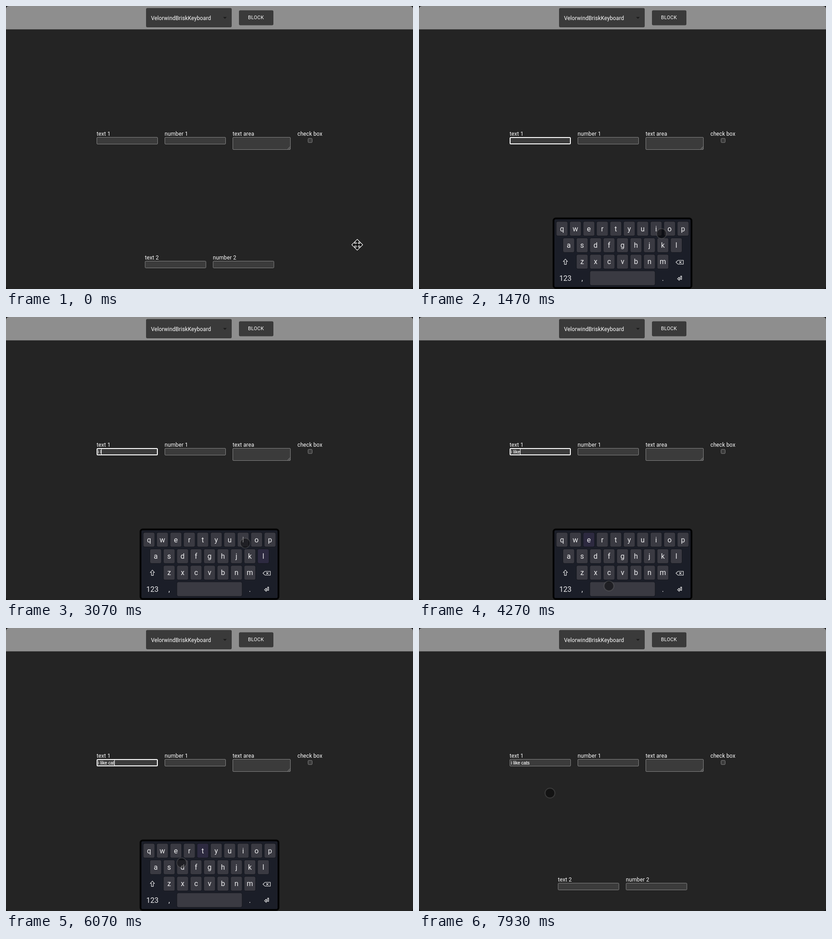
An HTML page for the animation above (8 s loop, 898 by 624 pixels).

```html
<!DOCTYPE html>
<html lang="en">
<head>
<meta charset="utf-8">
<title>On-screen keyboard</title>
<style>
  html, body { margin: 0; width: 100%; height: 100%; overflow: hidden; background: #111; }
  svg { display: block; width: 898px; height: 624px; }
  text { font: 12px Roboto, sans-serif; letter-spacing: .00938em; fill: #fff; white-space: pre; }
  .button { font-size: 10.8px; letter-spacing: .02857em; }
  .field { fill: #3b3b3b; stroke: #858585; }
  .typing #text1 { stroke: #fff; stroke-width: 2; x: 201px; y: 290px; width: 133px; height: 14px; }
  #typed { font: 10px "Liberation Sans", Arial, sans-serif; letter-spacing: 0; stroke: #fff; stroke-width: .2; }
  .key { fill: #3a3a42; stroke: #14161d; }
  .key.last { fill: #2d2a40; }
  .key.down { fill: #f1f1f1; }
  .cap { font-size: 16px; letter-spacing: 0; fill: #ececee; text-anchor: middle; }
  .icon { fill: none; stroke: #f4f4f4; stroke-width: 1.1; }
  #touch { fill: rgba(0, 0, 0, .45); stroke: rgba(128, 128, 128, .3); stroke-width: 2; }
</style>
</head>
<body>
<svg id="stage" viewBox="0 0 898 624">
  <rect width="898" height="624" rx="7" fill="#242424"/>
  <path d="M0 51.5V7Q0 0 7 0H891Q898 0 898 7V51.5Z" fill="#8e8e8e"/>
  <rect x="309" y="4.5" width="189" height="42.5" rx="3" fill="#3a3a3a"/>
  <text x="320" y="30.5">VelorwindBriskKeyboard</text>
  <path d="M479 24.2h8l-4 4z" fill="#1b1b1b"/>
  <rect x="514" y="9.5" width="76" height="33" rx="3" fill="#3a3a3a"/>
  <text class="button" x="534" y="29.3">BLOCK</text>
  <g id="form"></g>
  <path d="M621.5 315.5l5-5M624.5 315.5l2-2" stroke="#aaa" stroke-width=".8"/>
  <text id="typed" x="203" y="300.6"></text>
  <rect id="caret" y="291" width="1" height="12" fill="#fff"/>
  <g id="keyboard">
    <rect x="296.8" y="468.3" width="304.4" height="153.4" rx="5" fill="#1b1e28" stroke="#000" stroke-width="3.8"/>
    <g id="keys"></g>
    <g class="icon">
      <path d="M323 558l4.5 5.2h-2.4v6.4h-4.2v-6.4h-2.4z"/>
      <path d="M567 565l4.5-4.3H583.2v8.6H571.5zM574.2 562.6l4.8 4.8M579 562.6l-4.8 4.8"/>
      <path d="M577.3 595.6h2.2v7h-5.4v2.2l-3.8-3.3 3.8-3.3v2.2h3.2z"/>
    </g>
  </g>
  <g id="mover" transform="translate(775 526.5)" stroke="#fff" stroke-width="1.2">
    <path d="M0-12L12 0 0 12-12 0Z"/>
    <path fill="#242424" d="M-5.5-5.5h3.5v3.5h-3.5zM2-5.5h3.5v3.5h-3.5zM-5.5 2h3.5v3.5h-3.5zM2 2h3.5v3.5h-3.5z"/>
  </g>
  <circle id="touch" r="10.8"/>
</svg>
<script>
const LOOP = 8000, STEP = 1000 / 15, PRESS = 130, BLINK = 500;
const TOUCH_START = 60, FOCUS = 525, BLUR = 7590;
const MESSAGE = "i like cats";
const pressTimes = [1660, 2130, 2595, 3195, 3730, 4065, 4465, 4795, 5190, 5770, 6530];

const $ = id => document.getElementById(id);
const keys = {};

function add(parent, tag, attrs, content = "") {
  const el = document.createElementNS("http://www.w3.org/2000/svg", tag);
  for (const name in attrs) el.setAttribute(name, attrs[name]);
  el.textContent = content;
  $(parent).append(el);
  return el;
}

function addBox(x, y, width, height, id = "") {
  add("form", "rect", { class: "field", id, x: x + .5, y: y + .5, width: width - 1, height: height - 1, rx: 1.5 });
}

function addField(label, x, y, width = 135, height = 16, id = "") {
  add("form", "text", { x, y: y - 3 }, label);
  addBox(x, y, width, height, id);
}

function addCap(content, x, y) {
  add("keys", "text", { class: "cap", x, y: y + 5.6 }, content);
}

function addKey(char, x, y, width = 25.5, aimX = x) {
  const el = add("keys", "rect", { class: "key", x: x - width / 2, y: y - 16, width, height: 32, rx: 3.5 });
  keys[char] = { el, aim: [aimX, y + 4] };
  addCap(char, x, y);
}

addField("text 1", 200, 289, 135, 16, "text1");
addField("number 1", 350, 289);
addField("text area", 500, 289, 128, 28);
addField("text 2", 306.5, 562);
addField("number 2", 456.5, 562);
add("form", "text", { x: 643, y: 286 }, "check box");
addBox(666, 291.5, 10, 10);

["qwertyuiop", "asdfghjkl", "zxcvbnm"].forEach((row, r) => {
  [...row].forEach((char, i) => addKey(char, 449 + (i - (row.length - 1) / 2) * 29.68, 491 + r * 36.4));
});
addKey(" ", 449, 600, 144, 424);
addCap("123", 323, 600.5);
addCap(",", 360, 600.5);
addCap(".", 538, 600.5);

const strokes = pressTimes.map((time, i) => ({ time, char: MESSAGE[i] }));
const stops = [
  [0, 775, 526],
  [FOCUS, 272, 304],
  [930, 642, 564],
  ...strokes.map(({ time, char }) => [time, ...keys[char].aim]),
  [BLUR, 648, 627],
  [7930, 289, 364]
];

const ramp = (k, from, to) => Math.min(1, Math.max(0, (k - from) / (to - from)));
const smooth = k => k * k * (3 - 2 * k);

// The pointer travels early, hovers just short of its aim, then settles on it.
function pointerAt(t) {
  const next = stops.findIndex(stop => stop[0] > t);
  if (next < 0) return stops.at(-1).slice(1);
  const [t0, x0, y0] = stops[next - 1], [t1, x1, y1] = stops[next];
  const k = (t - t0) / (t1 - t0);
  const part = .9 * smooth(ramp(k, .2, .5)) + .1 * ramp(k, .93, 1);
  return [x0 + (x1 - x0) * part, y0 + (y1 - y0) * part];
}

function show(id, visible) {
  $(id).style.display = visible ? "" : "none";
}

function draw(t) {
  const focused = t >= FOCUS && t < BLUR;
  const done = strokes.filter(s => s.time <= t);
  const latest = done.at(-1) || { time: FOCUS };
  const released = done.filter(s => s.time + PRESS <= t).at(-1);

  $("stage").classList.toggle("typing", focused);
  show("keyboard", focused);
  $("typed").textContent = MESSAGE.slice(0, done.length);

  show("caret", focused && Math.floor((t - latest.time) / BLINK) % 2 === 0);
  $("caret").setAttribute("x", Math.round(203 + $("typed").getComputedTextLength()));

  for (const char in keys) {
    const { classList } = keys[char].el;
    classList.toggle("down", char === latest.char && t < latest.time + PRESS);
    classList.toggle("last", char !== " " && char === released?.char);
  }

  show("mover", t < TOUCH_START);
  show("touch", t >= TOUCH_START);
  $("touch").setAttribute("transform", `translate(${pointerAt(t)})`);
}

const start = performance.now();
function tick() {
  const t = (performance.now() - start) % LOOP;
  draw(Math.floor((t + 5) / STEP) * STEP % LOOP);
  requestAnimationFrame(tick);
}
tick();
</script>
</body>
</html>
```
